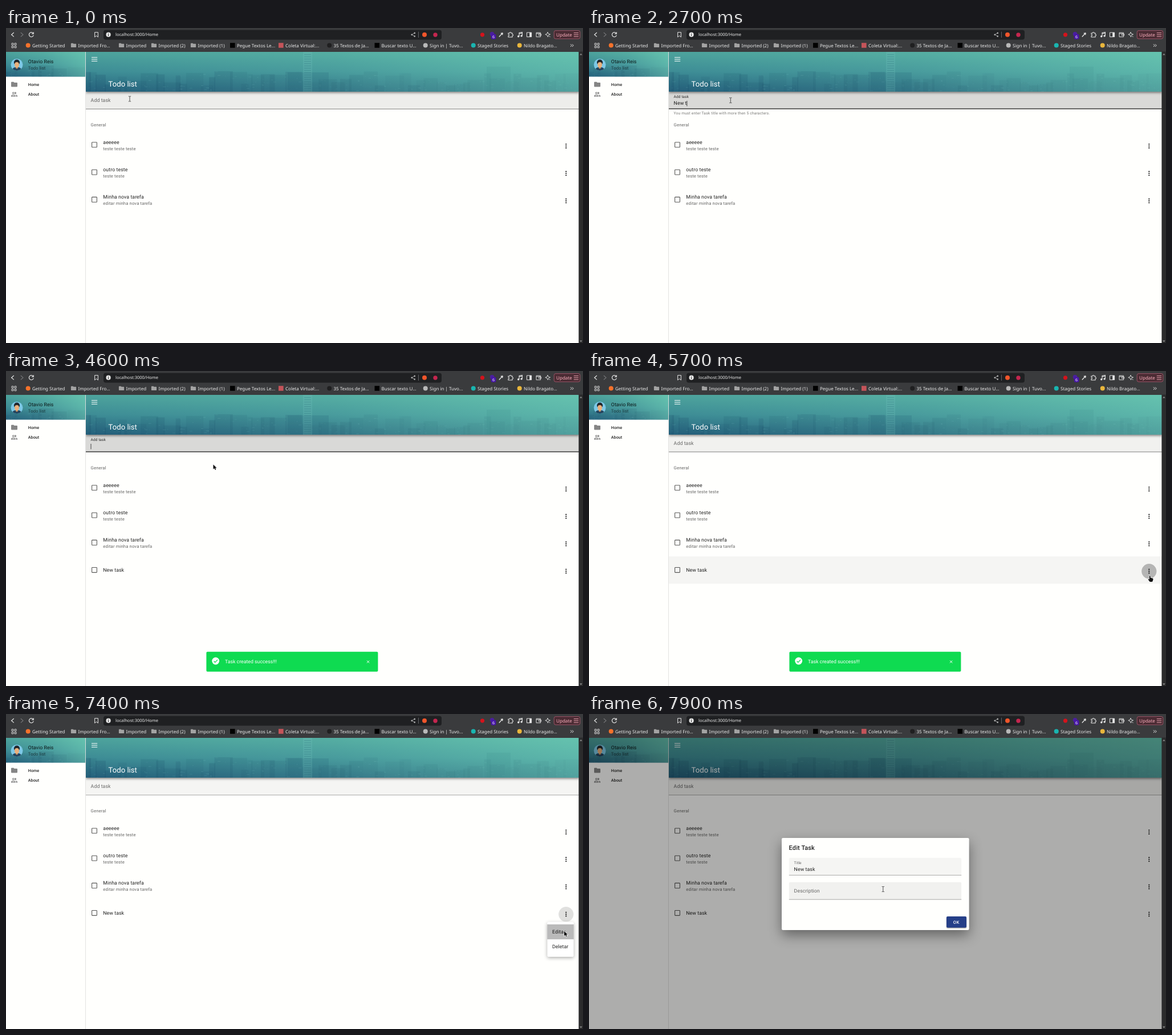
These frames come from a looping animation (1012 by 554 pixels, 8000 ms). An HTML page with a canvas:

```html
<!DOCTYPE html>
<html lang="en">
<head>
<meta charset="utf-8">
<title>Todo list</title>
<style>
html, body { margin: 0; width: 100%; height: 100%; overflow: hidden; background: #fffffd; }
canvas { display: block; width: 1012px; height: 554px; }
</style>
</head>
<body>
<canvas id="stage"></canvas>
<script>
const W = 1012, H = 554, LOOP = 8000, STEP = 100;
const TOP = 42, RIGHT = 1005, SIDE = 140, HEAD = 112.1;
const S = W / 1848; // page pixels to stage pixels
const PAGE = '#fffffd';
const canvas = document.getElementById('stage');
const ctx = canvas.getContext('2d');
const dpr = window.devicePixelRatio || 1;
canvas.width = W * dpr;
canvas.height = H * dpr;

const black = a => `rgba(0,0,0,${a})`;
const clamp = v => Math.min(1, Math.max(0, v));
const ramp = (t, from, len) => clamp((t - from) / len);
const lerp = (a, b, p) => a + (b - a) * p;
const smooth = p => p * p * (3 - 2 * p);
const easeOut = p => 1 - (1 - p) ** 2;
const within = (t, a, b) => t >= a && t < b;

function rect(x, y, w, h, color, r = 0) {
  ctx.fillStyle = color;
  ctx.beginPath();
  ctx.roundRect(x, y, w, h, r);
  ctx.fill();
}

function disc(x, y, r, color) {
  ctx.fillStyle = color;
  ctx.beginPath();
  ctx.arc(x, y, r, 0, Math.PI * 2);
  ctx.fill();
}

function line(d, color, width = 1) {
  ctx.strokeStyle = color;
  ctx.lineWidth = width;
  ctx.stroke(new Path2D(d));
}

function shape(d, color) {
  ctx.fillStyle = color;
  ctx.fill(new Path2D(d));
}

function group(draw, { x = 0, y = 0, scale = 1, alpha = 1 } = {}) {
  ctx.save();
  ctx.translate(x, y);
  ctx.scale(scale, scale);
  ctx.globalAlpha *= alpha;
  draw();
  ctx.restore();
}

function shadowed(blur, dy, alpha, draw) {
  ctx.save();
  ctx.shadowColor = black(alpha);
  ctx.shadowBlur = blur * dpr;
  ctx.shadowOffsetY = dy * dpr;
  draw();
  ctx.restore();
}

// Page text: size in page pixels, spacing in em
function setType(size, weight, spacing, family) {
  ctx.font = `${weight} ${size}px ${family}, sans-serif`;
  ctx.letterSpacing = `${spacing * size}px`;
}

function text(str, x, y, px, color = black(.87), weight = 400, spacing = .009) {
  setType(px * S, weight, spacing, 'Roboto');
  ctx.fillStyle = color;
  ctx.fillText(str, x, y);
}

function uiText(str, x, y, size, color = '#ececec', weight = 400, spacing = 0) {
  setType(size, weight, spacing, '"Noto Sans"');
  ctx.fillStyle = color;
  ctx.fillText(str, x, y);
}

/* ---------- browser bars ---------- */
const FOLDER = 'M10 4H4C2.9 4 2 4.9 2 6V18A2 2 0 0 0 4 20H20A2 2 0 0 0 22 18V8C22 6.9 21.1 6 20 6H12Z';
const PEOPLE = 'M13.07 10.41A5 5 0 0 0 13.07 4.59A3.39 3.39 0 0 1 15 4A3.5 3.5 0 0 1 15 11A3.39 3.39 0 0 1 13.07 10.41'
  + 'M5.5 7.5A3.5 3.5 0 1 1 9 11A3.5 3.5 0 0 1 5.5 7.5M7.5 7.5A1.5 1.5 0 1 0 9 6A1.5 1.5 0 0 0 7.5 7.5'
  + 'M16 17V19H2V17S2 13 9 13 16 17 16 17M14 17C13.9 16.2 12.7 15 9 15S4.1 16.3 4 17'
  + 'M15.95 13A5.3 5.3 0 0 1 18 17V19H22V17S22 13.4 15.94 13Z';

function icon24(d, cx, cy, scale, color) {
  group(() => shape(d, color), { x: cx - 12 * scale, y: cy - 12 * scale, scale });
}

const bookmarks = [
  ['Getting Started', 46, 'disc', '#f5722b'],
  ['Imported Fro...', 126.5, 'folder'],
  ['Imported', 210.5, 'folder'],
  ['Imported (2)', 267.5, 'folder'],
  ['Imported (1)', 336.5, 'folder'],
  ['Pegue Textos Le...', 405, 'square', '#000'],
  ['Coleta Virtual:...', 490, 'square', '#c4545a'],
  ['35 Textos de Ja...', 574.5, 'disc', '#1f1f20'],
  ['Buscar texto U...', 658.5, 'square', '#000'],
  ['Sign in | Tuvo...', 743, 'disc', '#b9b9b9'],
  ['Staged Stories', 827, 'disc', '#19b5b0'],
  ['Nildo Bragato...', 908, 'disc', '#e9b63c'],
];

function browserBars() {
  const ink = '#e6e6e6';
  rect(0, 0, W, TOP, '#3a3b3d');
  line('M13.8 8L9.6 11.7L13.8 15.4', ink, 1.2);
  line('M25.8 8L30 11.7L25.8 15.4', '#77787a', 1.1);
  line('M47.4 9A4 4 0 1 0 48.3 12.6M48.3 7.2V10.2H45.2', ink, 1.2);
  line('M155.6 7.6H161.4V16L158.5 13.6L155.6 16Z', ink);
  rect(171, 3.4, 593, 17, '#1f2022', 4);
  disc(179.6, 11.7, 4.1, ink);
  rect(179.1, 11, 1, 3, '#1f2022');
  rect(179.1, 9.2, 1, 1, '#1f2022');
  uiText('localhost:3000/Home', 192, 14.3, 7.5);
  line('M716.7 8.9L711.7 11.7L716.7 14.6', '#b5b5b5', .8);
  [[716.7, 8.9], [711.7, 11.7], [716.7, 14.6]].forEach(([x, y]) => disc(x, y, 1.3, '#b5b5b5'));
  rect(723, 6.5, .8, 10.5, '#77787a');
  disc(734, 11.8, 4, '#f2552b');
  disc(753, 12, 3.7, '#c5264f');

  disc(835.5, 11.8, 3.6, '#d4131c');
  disc(852.5, 10.5, 3.8, '#4a1f9c');
  rect(850.8, 10.6, 8.6, 9.2, '#4816a8', 2.5);
  uiText('6', 853, 18, 7, '#fff');
  line('M864.8 15.5L869.5 10.4M868 8.8L871.2 12', ink, 1.4);
  line('M869.8 10.2L871.3 8.7', ink, 2.6);
  line('M881 9H883.2A1.5 1.5 0 0 1 886.2 9H888V11A1.4 1.4 0 0 1 888 13.8V16H881V13.8A1.4 1.4 0 0 0 881 11Z', ink, 1.1);
  line('M900 14.6V8.4L905.4 7.4V13.6M900 10L905.4 9', ink, 1.1);
  disc(898.7, 14.8, 1.7, ink);
  disc(904.1, 13.9, 1.7, ink);
  line('M913.4 8H921.6V15.6H913.4Z', ink);
  rect(918.2, 8, 3.4, 7.6, ink);
  line('M930 8.2H937.6V15.6H930ZM934.6 10.6H938.6V13.2H934.6ZM930 9.8H937', ink, .9);
  line('M950 7.2L951.3 10.2L954.6 11.2L951.6 12.5L950.4 15.8L949 12.6L945.8 11.4L948.8 10.2ZM952.5 14L954.5 16', ink, .9);
  rect(961.2, 4.6, 45.6, 14.4, '#4a2b33', 3);
  ctx.strokeStyle = '#a2566a';
  ctx.lineWidth = .9;
  ctx.stroke(new Path2D('M964 4.6H1004A2.8 2.8 0 0 1 1006.8 7.4V16.2A2.8 2.8 0 0 1 1004 19H964A2.8 2.8 0 0 1 961.2 16.2V7.4A2.8 2.8 0 0 1 964 4.6Z'));
  uiText('Update', 965, 14.6, 8.1, '#ffb3c1');
  line('M995.8 8.6H1004.2M995.8 11.8H1004.2M995.8 15H1004.2', '#ffb3c1', .9);

  [10, 15].forEach(x => [26.8, 31.8].forEach(y => line(`M${x} ${y}h3v3h-3z`, ink, .9)));
  bookmarks.forEach(([label, x, kind, color]) => {
    if (kind === 'folder') icon24(FOLDER, x - 8, 30.4, .46, '#a3a3a3');
    else if (kind === 'square') rect(x - 12, 26.2, 8.6, 8.6, color);
    else disc(x - 7.3, 30.6, 4, color);
    uiText(label, x, 33.5, 8);
  });
  line('M990 28.4L992.2 30.7L990 33M993 28.4L995.2 30.7L993 33', ink);
}

/* ---------- page parts ---------- */
// Hazy skyline under a teal haze
function city(x, y, w, h, seed) {
  const rnd = () => (seed = (seed * 16807) % 2147483647) / 2147483647;
  const fill = (x0, y0, x1, y1, stops) => {
    const g = ctx.createLinearGradient(x0, y0, x1, y1);
    stops.forEach((c, i) => g.addColorStop(i / (stops.length - 1), c));
    rect(x, y, w, h, g);
  };
  ctx.save();
  ctx.beginPath();
  ctx.rect(x, y, w, h);
  ctx.clip();
  fill(x, y, x, y + h, ['#4da39c', '#3d8c95', '#27647f']);
  for (let bx = x; bx < x + w;) {
    const bw = 8 + rnd() * 26, bh = h * (.15 + rnd() * .38);
    rect(bx, y + h - bh, bw, bh, `rgba(15,60,90,${.06 + rnd() * .12})`);
    for (let i = 0; i < 5; i++) {
      rect(bx + rnd() * bw, y + h - rnd() * bh, 1 + rnd() * 4, 1, `rgba(150,215,215,${rnd() * .16})`);
    }
    bx += bw * (.6 + rnd() * .5);
  }
  if (w > 400) {
    rect(494, y + 36, 72, h, 'rgba(15,70,100,.18)');
    rect(521, y, 16, h, 'rgba(120,195,195,.2)');
    for (let wy = y + 4; wy < y + h; wy += 4) rect(523, wy, 12, 1.2, 'rgba(20,80,105,.28)');
    rect(843, y + 26, 42, h, 'rgba(15,80,100,.16)');
  }
  fill(x, y, x + w, y, ['rgba(125,225,192,0)', 'rgba(125,225,192,.18)', 'rgba(125,225,192,.5)']);
  ctx.restore();
}

function avatar(cx, cy) {
  ctx.save();
  ctx.beginPath();
  ctx.arc(cx, cy, 10.5, 0, Math.PI * 2);
  ctx.clip();
  rect(cx - 11, cy - 11, 22, 22, '#7cc8e6');
  rect(cx - 8, cy + 4.8, 16, 10, '#23455f', 5);
  rect(cx - 1.8, cy + 2, 3.6, 5, '#d9985f', 1.5);
  disc(cx, cy - 4, 5.1, '#20262c');
  rect(cx - 3.8, cy - 4.6, 7.6, 9.4, '#eab07c', 3.6);
  ctx.restore();
}

function sidebar() {
  rect(0, TOP, SIDE, H - TOP, PAGE);
  city(0, TOP, 139.5, 43.8, 77);
  avatar(19, 64.5);
  text('Otavio Reis', 38.8, 62, 16);
  text('Todo list', 38.8, 73.2, 14, black(.6), 400, .0178);
  icon24(FOLDER, 14.5, 99.2, S, '#858585');
  icon24(PEOPLE, 14.5, 116.8, S, '#858585');
  text('Home', 38.8, 101.7, 13, black(.87), 500);
  text('About', 38.8, 119.2, 13, black(.87), 500);
  rect(139.2, TOP, .8, H - TOP, '#dcdcda');
}

function header() {
  shadowed(4, 1.6, .45, () => rect(SIDE, TOP, RIGHT - SIDE, HEAD - TOP, '#27647f'));
  city(SIDE, TOP, RIGHT - SIDE, HEAD - TOP, 4211);
  line('M150 51.8H160.2M150 55H160.2M150 58.2H160.2', '#fff', 1.1);
  text('Todo list', 179.6, 103.2, 24, '#fff', 400, 0);
}

const typing = [[1800, 'N'], [2000, 'Ne'], [2200, 'New'], [2400, 'New '], [2700, 'New t'],
  [2800, 'New ta'], [3000, 'New tas'], [3300, 'New task'], [3800, '']];
const caretOn = [[800, 1300], [1800, 3600], [3800, 4100], [4500, 5000]];

function taskField(t) {
  const focus = ramp(t, 550, 250) * (1 - ramp(t, 5480, 250));
  const float = ramp(t, 500, 200) * (1 - ramp(t, 5480, 150));
  const hover = t < 5500;
  const x = 148.6, bottom = 142.7, lineH = lerp(.8, 1.3, focus);
  rect(SIDE, HEAD, RIGHT - SIDE, bottom - HEAD, black(lerp(hover ? .07 : .04, .15, focus)));
  rect(SIDE, bottom - lineH, RIGHT - SIDE, lineH, black(lerp(hover ? .6 : .42, .87, focus)));
  text('Add task', x, lerp(130, 122.8, float), lerp(16, 12, float), black(lerp(.58, .82, float)));

  const typed = typing.reduce((cur, [at, str]) => (t >= at ? str : cur), '');
  text(typed, x, 135.4, 16);
  if (caretOn.some(([a, b]) => within(t, a, b))) {
    rect(x + ctx.measureText(typed).width, 128, .8, 9.6, black(.87));
  }
  const hint = ramp(t, 1700, 300) * (1 - ramp(t, 2700, 300));
  if (hint) {
    text('You must enter Task title with more then 5 characters.', x, 152.4, 12, black(.55 * hint), 400, .0333);
  }
}

function dots(cx, cy) {
  [-3.3, 0, 3.3].forEach(d => disc(cx, cy + d, 1.15, black(.85)));
}

const tasks = [['aeeeee', 'teste teste teste'], ['outro teste', 'teste teste'],
  ['Minha nova tarefa', 'editar minha nova tarefa'], ['New task', '']];

function taskList(t) {
  text('General', 148.6, 172.8, 14, black(.6), 400, .0178);
  tasks.forEach(([title, note], i) => {
    const added = i === 3;
    if (added && t < 3800) return;
    const y = 205.4 + i * 48.19;
    if (added && within(t, 5600, 5900)) rect(SIDE, y - 24, RIGHT - SIDE, 48.2, black(.04));
    if (added && within(t, 5600, 7500)) {
      disc(982.3, y + 2.2, 13.1, black(lerp(.26, .12, ramp(t, 5700, 300))));
    }
    ctx.strokeStyle = black(.66);
    ctx.lineWidth = 1.1;
    ctx.beginPath();
    ctx.roundRect(150.6, y - 4.4, 8.8, 8.8, .8);
    ctx.stroke();
    text(title, 170.3, note ? y - 1.7 : y + 2.8, 16);
    text(note, 170.3, y + 9.2, 14, black(.6), 400, .0178);
    dots(982.3, y + 2.2);
  });
}

function suggestions() {
  shadowed(3, 1, .35, () => {
    rect(194, 147.8, 85.6, 83.2, '#19181d', 2);
    shape('M199.6 148.2L205.2 142.8L210.8 148.2Z', '#19181d');
  });
  ['aeeee', 'tttttttttttt', 'ssd', 'ddddddd'].forEach((word, i) => {
    uiText(word, 200.6, 163 + i * 19.65, 8.8, '#f4f4f4', 500, i === 1 ? .05 : 0);
  });
}

function toast(t) {
  const p = easeOut(ramp(t, 3800, 800)), q = ramp(t, 6700, 600);
  if (!p || q === 1) return;
  group(() => {
    rect(351.4, 493.8, 301, 34.9, '#0fdb51', 2);
    disc(367.7, 510, 6.4, '#fff');
    line('M364.6 510.2L366.8 512.4L371 507.9', '#0fdb51', 1.3);
    text('Task created success!!!', 384, 514.2, 16, '#fff', 400, 0);
    line('M633 509.3L637.2 513.5M637.2 509.3L633 513.5', '#fff', 1);
  }, { y: 38 * (1 - p + q * q), alpha: p * (1 - q) });
}

function menu(t) {
  const p = easeOut(ramp(t, 5750, 300)), out = ramp(t, 7450, 150);
  if (!p || out === 1) return;
  const scale = lerp(.4, 1, p);
  group(() => {
    shadowed(6, 2.2, .32, () => rect(949.4, 365.5, 46.2, 61.4, '#fff', 2));
    const press = t >= 7300 ? .27 : t >= 6900 ? .05 : 0;
    rect(949.4, 369.9, 46.2, 26.3, black(press));
    text('Editar', 958, 385.8, 16);
    text('Deletar', 958, 412.1, 16);
  }, { x: 982 * (1 - scale), y: 352 * (1 - scale), scale, alpha: p * (1 - out) });
}

function inputBox(y, tint) {
  rect(350.8, y, 302.4, 30.7, black(tint), [2, 2, 0, 0]);
  rect(350.8, y + 30, 302.4, .8, black(.42));
}

function dialog(t) {
  const p = easeOut(ramp(t, 7450, 300));
  if (!p) return;
  rect(0, TOP - .5, RIGHT, H - TOP + .5, black(.32 * p));
  const scale = lerp(.85, 1, p);
  group(() => {
    shadowed(22, 9, .42, () => rect(338, 218, 328.6, 162, PAGE, 2.2));
    text('Edit Task', 350.6, 239.3, 20, black(.87), 500, .0125);
    inputBox(253, .04);
    text('Title', 359.6, 263.9, 12, black(.6));
    text('New task', 359.6, 276.4, 16);
    inputBox(295.8, .055);
    text('Description', 359.6, 313.8, 16, black(.58));
    shadowed(2, 1, .4, () => rect(627, 356, 35, 19.7, '#253f88', 2));
    text('OK', 638.7, 368.6, 14, '#fff', 500, .06);
  }, { x: 502.3 * (1 - scale), y: 299 * (1 - scale), scale, alpha: p });
}

function scrollbar() {
  rect(RIGHT - .6, TOP - .4, W - RIGHT + .6, H - TOP + .4, '#2b2b2c');
  shape('M1006.2 47.6L1008.4 44.8L1010.6 47.6Z', '#8e8e8e');
  shape('M1006.2 549.6L1008.4 552.4L1010.6 549.6Z', '#8e8e8e');
}

/* ---------- pointer ---------- */
const pointerPath = [[0, 217, 124.6], [300, 217, 124.6], [400, 245, 126], [600, 248.3, 127.2], [4300, 248.3, 127.2],
  [5500, 985.4, 365.4], [6700, 985.4, 365.4], [7100, 979, 382], [7400, 979, 382], [7800, 515.8, 308], [LOOP, 515.8, 308]];

function pointer(t) {
  const i = pointerPath.findIndex(k => k[0] > t);
  const [t0, x0, y0] = pointerPath[i - 1], [t1, x1, y1] = pointerPath[i];
  const p = smooth((t - t0) / (t1 - t0));
  const beam = t < 4500 || t >= 7800, hand = within(t, 5400, 6800);
  group(() => {
    if (beam) {
      line('M-2.1 -4.5H-.5L0 -4L.5 -4.5H2.1M0 -4V4M-2.1 4.5H-.5L0 4L.5 4.5H2.1', '#333', .85);
      return;
    }
    const d = hand
      ? 'M-2.6 -4.6C-2.6 -5.8 -.8 -5.8 -.8 -4.6V-1.8L2.8 -1C3.8 -.8 4.3 0 4.1 .9L3.6 3.2L2.6 5.4H-1.8L-4.6 1.6C-5 .6 -4 0 -3.4 .6L-2.6 1.4Z'
      : 'M0 0V8.4L2 6.6L3.4 9.6L4.9 8.9L3.5 6H6.1Z';
    line(d, '#fff', 1.3);
    shape(d, '#111');
  }, { x: lerp(x0, x1, p), y: lerp(y0, y1, p) });
}

function draw(t) {
  ctx.setTransform(dpr, 0, 0, dpr, 0, 0);
  ctx.textRendering = 'geometricPrecision';
  rect(0, 0, W, H, PAGE);
  taskField(t);
  taskList(t);
  header();
  sidebar();
  if (within(t, 800, 1800)) suggestions();
  toast(t);
  menu(t);
  dialog(t);
  browserBars();
  scrollbar();
  pointer(t);
}

let shown = -1;
const start = performance.now();
function tick() {
  const t = Math.floor(((performance.now() - start) % LOOP) / STEP) * STEP;
  if (t !== shown) draw(shown = t);
  requestAnimationFrame(tick);
}
tick();
</script>
</body>
</html>
```
